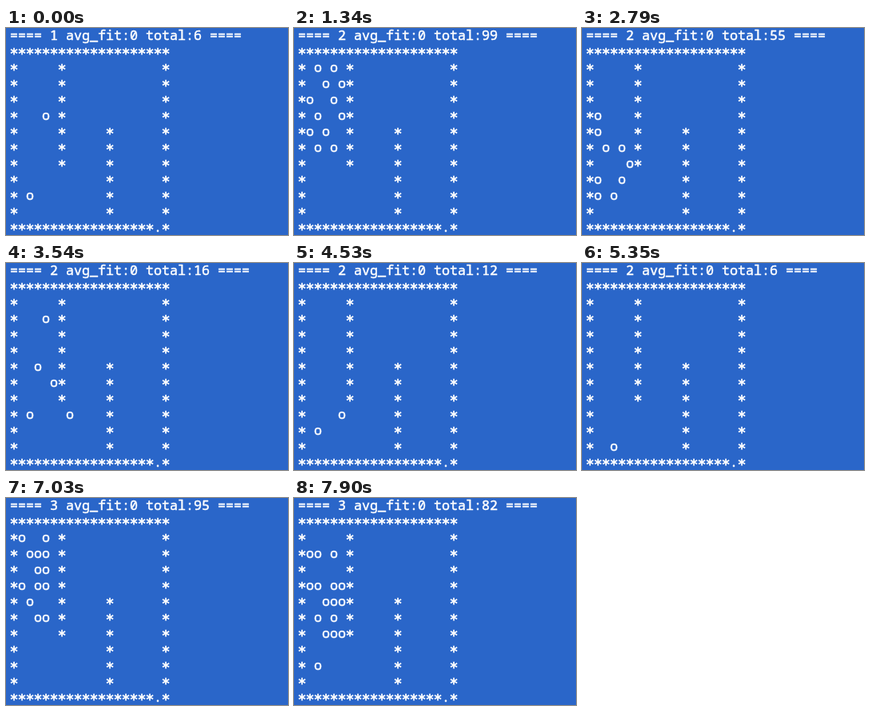
These frames come from a looping animation (353x259 px, 8000 ms). An HTML page with a canvas:

```html
<!DOCTYPE html>
<html lang="en">
<head>
<meta charset="utf-8">
<title>Maze walkers</title>
<style>
  html, body { margin: 0; width: 100%; height: 100%; overflow: hidden; background: #2a66c9; }
  canvas { display: block; }
</style>
</head>
<body>
<canvas id="stage" width="353" height="259"></canvas>
<script>
const ctx = document.getElementById('stage').getContext('2d');
const LOOP = 8000, LAST = 101, CELL = 10, LINE = 20, LEFT = 5;
const TEXT = '500 16.67px "Noto Sans Mono", monospace';
const STAR = '18.5px "DejaVu Sans Mono", monospace';
const SECOND = 13, THIRD = 86; // steps at which new generations start

let seed = 41;
function random() {
  seed = (seed * 1664525 + 1013904223) % 4294967296;
  return seed / 4294967296;
}

// The screen refreshes every 58 ms; about three of four refreshes show a new step
function stepAt(t) {
  const tick = Math.floor((t - 165) / 58);
  return tick < 0 ? 0 : Math.min(LAST, Math.floor(tick * .752 + .5) + 1);
}

// Living walkers at key steps, linear in between
const totals = [[0, 6], [SECOND - 1, 1], [SECOND, 100], [16, 99], [27, 86], [45, 16],
  [57, 12], [76, 1], [THIRD - 1, 1], [THIRD, 100], [LAST, 82]];
function totalAt(step) {
  const i = Math.max(1, totals.findIndex(p => p[0] >= step));
  const [s0, v0] = totals[i - 1], [s1, v1] = totals[i];
  return Math.round(v0 + (v1 - v0) * (step - s0) / (s1 - s0));
}

const distance = (x, y, u, v) => Math.max(Math.abs(x - u), Math.abs(y - v));

// Random move that can still reach (tx, ty) in the steps left
function nextCell(x, y, tx, ty, left) {
  if (left <= 1) return [tx, ty];
  const options = [];
  for (let u = x - 1; u <= x + 1; u++) {
    for (let v = y - 1; v <= y + 1; v++) {
      const moved = u !== x || v !== y;
      const inside = u >= 1 && u <= Math.max(5, tx) && v >= 2 && v <= 11 && (u < 6 || v > 8);
      if (moved && inside && distance(u, v, tx, ty) < left) options.push([u, v]);
    }
  }
  return options.length ? options[Math.floor(random() * options.length)] : [x, y];
}

const cells = Array.from({ length: LAST + 1 }, () => []);

// points: [step, column, row]; the walker vanishes after step `last`
function walk(points, last) {
  let [step, x, y] = points[0];
  let goal = 1;
  for (; step <= Math.min(last, LAST); step++) {
    cells[step].push([x, y]);
    while (goal < points.length && points[goal][0] <= step) goal++;
    const [ts, tx, ty] = points[goal] || [step + 4, 3, 8];
    [x, y] = nextCell(x, y, tx, ty, ts - step);
  }
}

// Start together, spread out, then drift down the corridor
function scatter(birth, i, count) {
  const part = i / count;
  return [
    [birth, 3, 5],
    [birth + 3, 1 + (i * 3 + 3) % 5, 2 + Math.floor(part * 6)],
    [birth + 14, 1 + (i * 2 + 1) % 5, 3 + Math.floor(part * 7)]
  ];
}

walk([[0, 4, 5], [SECOND - 1, 4, 6]], SECOND - 1);
walk([[0, 2, 10], [5, 3, 11]], 8);

const survivors = [
  { path: [[45, 4, 3]], last: 48 },
  { path: [[45, 3, 6]], last: 52 },
  { path: [[45, 5, 7]], last: 56 },
  { path: [[45, 2, 9], [57, 2, 10], [70, 4, 11], [75, 3, 10], [78, 0, 8], [79, 0, 8]], last: THIRD - 1 },
  { path: [[44, 6, 9], [45, 7, 9], [47, 6, 9], [57, 5, 9]], last: 64 }
];
for (let i = 0; i < 12; i++) {
  const { path, last } = survivors[i - 7] || { path: [], last: 29 + 2 * i };
  walk([...scatter(SECOND, i, 12), ...path], last);
}
for (let i = 0; i < 16; i++) walk(scatter(THIRD, i, 16), LAST);

function isWall(x, y) {
  if (y === 1) return true;
  if (y === 12) return x !== 18;
  return x === 0 || x === 19 || (x === 6 && y <= 8) || (x === 12 && y >= 6);
}

// The thin outline gives the medium weight of the terminal font
function put(char, x, y, drop = 15) {
  const left = LEFT + CELL * (x + .5), base = LINE * y + drop;
  ctx.fillText(char, left, base);
  ctx.strokeText(char, left, base);
}

ctx.font = STAR;
const box = ctx.measureText('*');
const starDrop = 9.8 + (box.actualBoundingBoxAscent - box.actualBoundingBoxDescent) / 2;

function draw(step) {
  ctx.fillStyle = '#2a66c9';
  ctx.fillRect(0, 0, 353, 259);
  ctx.fillStyle = ctx.strokeStyle = '#fff';
  ctx.textAlign = 'center';
  ctx.lineJoin = 'round';

  ctx.font = TEXT;
  ctx.lineWidth = .5;
  const generation = step < SECOND ? 1 : step < THIRD ? 2 : 3;
  const title = `==== ${generation} avg_fit:0 total:${totalAt(step)} ====`;
  [...title].forEach((char, x) => put(char, x, 0));
  put('.', 18, 12);
  const seen = new Set();
  for (const [x, y] of cells[step]) {
    const key = x + ',' + y;
    if (!isWall(x, y) && !seen.has(key)) put('o', x, y);
    seen.add(key);
  }

  ctx.font = STAR;
  ctx.lineWidth = .7;
  for (let y = 1; y <= 12; y++) {
    for (let x = 0; x < 20; x++) {
      if (isWall(x, y)) put('*', x, y, starDrop);
    }
  }
}

const begin = performance.now();
function frame() {
  draw(stepAt(Math.max(0, performance.now() - begin) % LOOP));
  requestAnimationFrame(frame);
}
frame();
</script>
</body>
</html>
```
